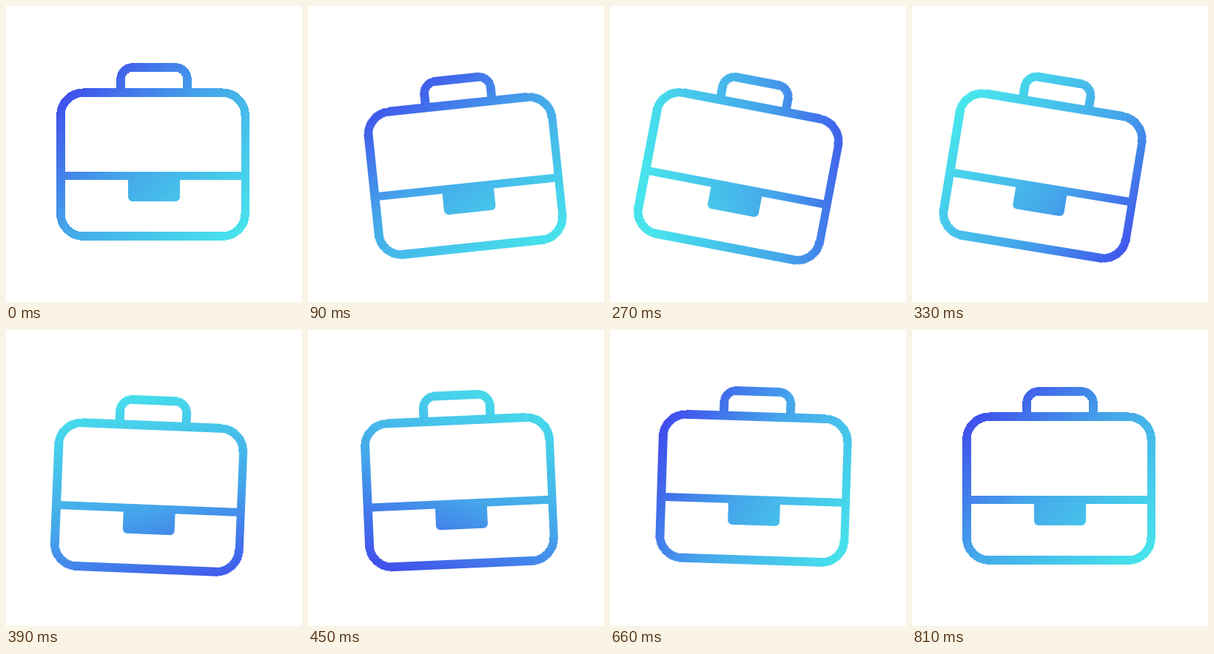
Animation of 400x400 px, one loop 2840 ms. Source, as an HTML page without scripts:

```html
<!DOCTYPE html>
<html lang="en">
<head>
<meta charset="utf-8">
<title>Briefcase</title>
<style>
  :root { --loop: 2.84s; --sine: cubic-bezier(.37, 0, .63, 1); }
  html, body { margin: 0; width: 100%; height: 100%; overflow: hidden; background: #fff; }
  svg { display: block; width: 100%; height: 100%; }
  .drop { animation: drop var(--loop) var(--sine) infinite; }
  .swing {
    fill: none; stroke: url(#tint); stroke-width: 11.5;
    shape-rendering: crispEdges;
    transform-origin: 200px 79.5px;
    animation: swing var(--loop) var(--sine) infinite;
  }
  .clasp { fill: url(#tint); stroke: none; }

  @keyframes drop {
    0% { animation-timing-function: cubic-bezier(.33, 0, .3, 1); }
    5.3%, 10.2% { transform: translateY(18.7px); }
    19%, 100% { transform: translateY(0); }
  }
  /* damped swing from the handle */
  @keyframes swing {
    0%, 28.5%, 100% { transform: rotate(0deg); }
    5.1% { transform: rotate(-8.6deg); }
    10.1% { transform: rotate(11.4deg); }
    16.3% { transform: rotate(-2.7deg); }
    22.2% { transform: rotate(2deg); }
  }
</style>
</head>
<body>
<svg viewBox="0 0 400 400">
  <defs>
    <linearGradient id="tint" gradientUnits="userSpaceOnUse" x1="43" y1="200" x2="363" y2="200" gradientTransform="rotate(45 216 200)">
      <stop offset="0" stop-color="#3f42ec"/>
      <stop offset=".47" stop-color="#45a6ea"/>
      <stop offset="1" stop-color="#47e4ec"/>
      <!-- one clockwise turn, then rest -->
      <animateTransform attributeName="gradientTransform" type="rotate" dur="2.84s" repeatCount="indefinite"
        calcMode="spline" keyTimes="0;.285;1" values="45 216 200;405 216 200;405 216 200"
        keySplines=".33 0 .5 1;0 0 1 1"/>
    </linearGradient>
  </defs>
  <g class="drop">
    <g class="swing">
      <path d="M155 117V99a16 16 0 0 1 16-16h58a16 16 0 0 1 16 16v18"/>
      <rect x="73.75" y="117.2" width="249.5" height="194" rx="31"/>
      <path d="M74 229.5H323"/>
      <path class="clasp" d="M165 229h70v29a6 6 0 0 1-6 6h-58a6 6 0 0 1-6-6z"/>
    </g>
  </g>
</svg>
</body>
</html>
```
